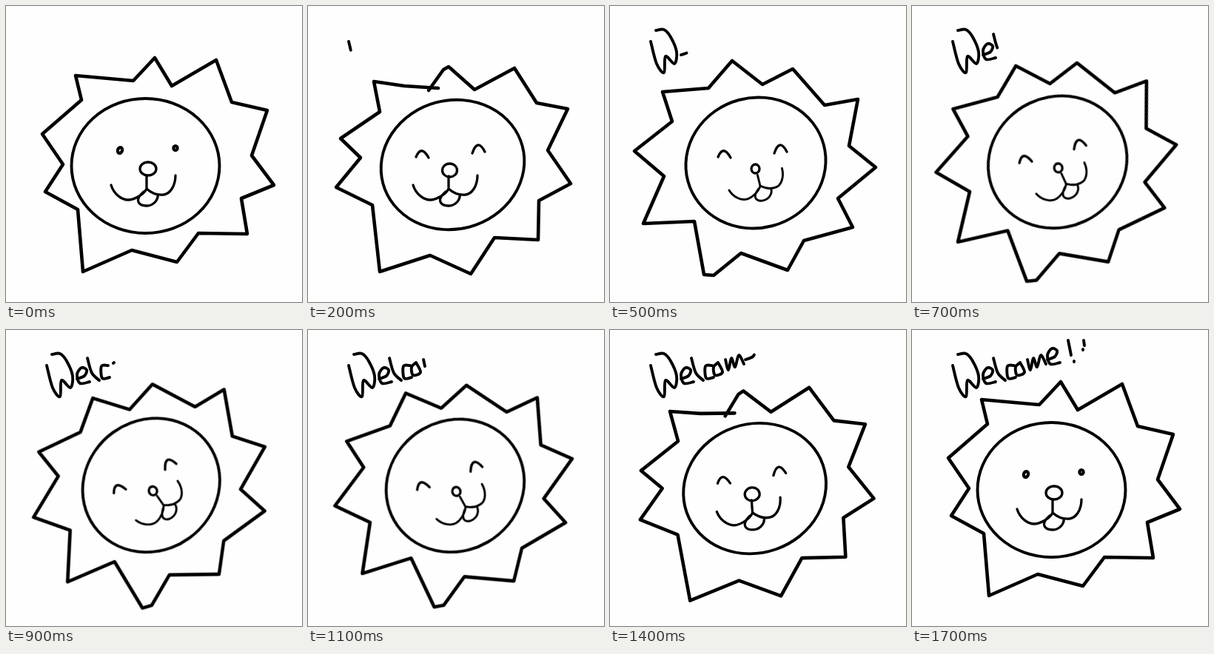
These frames come from a looping animation (400x400 px, 1800 ms). An HTML page:

```html
<!DOCTYPE html>
<html lang="en">
<head>
<meta charset="utf-8">
<title>Welcome lion</title>
<style>
  html, body { margin: 0; height: 100%; overflow: hidden; background: #fefefe; }
  svg { display: block; width: 100vw; height: 100vh; }
  path, ellipse { fill: none; stroke: #000; stroke-linecap: round; stroke-linejoin: round; }
</style>
</head>
<body>
<svg id="stage" viewBox="0 0 400 400"></svg>
<script>
const FRAME = 100, FRAMES = 18;
const stage = document.getElementById('stage');

function add(parent, tag, attrs = {}) {
  const node = document.createElementNS('http://www.w3.org/2000/svg', tag);
  for (const key in attrs) node.setAttribute(key, attrs[key]);
  return parent.appendChild(node);
}

function oval(parent, [cx, cy, rx, ry, tilt = 0], width) {
  add(parent, 'ellipse', { cx, cy, rx, ry, transform: `rotate(${tilt} ${cx} ${cy})`, 'stroke-width': width });
}

// Smooth pen line through a few points (Catmull-Rom)
function curve(text, dx = 0, dy = 0) {
  const pts = text.split(' ').map(p => p.split(',').map(Number)).map(([x, y]) => [x + dx, y + dy]);
  const at = i => pts[Math.max(0, Math.min(pts.length - 1, i))];
  let d = 'M' + pts[0];
  for (let i = 0; i < pts.length - 1; i++) {
    const [a, b, c, e] = [at(i - 1), at(i), at(i + 1), at(i + 2)];
    d += `C${b.map((v, k) => v + (c[k] - a[k]) / 6)} ${c.map((v, k) => v - (e[k] - b[k]) / 6)} ${c}`;
  }
  return d;
}

// Stem, both cheeks and tongue, around the middle of the mouth
const MUZZLE = 'M0,-17V0M-48,-5C-44,8 -33,15 -25,15S-4,8 0,0C8,7 15,9 23,8S39,-3 39,-18' +
  'M-4,4C-18,16 -10,23 0,23S16,14 15,8';

function lion({ mane, head, nose, muzzle, drawEyes }) {
  const g = add(stage, 'g');
  add(g, 'path', { d: 'M' + mane, 'stroke-width': 4.6 });
  oval(g, head, 3.9);
  oval(g, nose, 3.3);
  add(g, 'path', { d: MUZZLE, transform: muzzle, 'stroke-width': 3.3 });
  drawEyes(g);
  return g;
}

function openEyes(g) {
  oval(g, [154, 195, 3, 4, 20], 4.2);
  oval(g, [229, 192, 2.6, 3], 4.2);
}

function smilingEyes(g) {
  add(g, 'path', { d: 'M146,204Q153,187 163,205M222,199Q229,178 239,197', 'stroke-width': 3.3 });
}

const lions = {
  awake: lion({
    mane: '102,127 94,94 172,101 201,70 224,108 284,73 305,130 353,141 332,202 362,242 ' +
      '318,260 326,308 260,307 231,346 170,330 104,359 97,275 53,251 77,214 49,173z',
    head: [188.5, 216, 100, 91],
    nose: [192, 220, 11, 9],
    muzzle: 'translate(190 247)',
    drawEyes: openEyes
  }),
  happy: lion({
    mane: '163,114 183,86 190,82 225,113 279,84 309,131 351,139 324,195 355,240 312,263 311,316 ' +
      '252,313 220,362 165,337 97,359 87,269 38,245 71,205 44,179 97,143 89,102 130,108 176,111',
    head: [195.5, 214.5, 97.5, 87, -15],
    nose: [191.5, 222, 10, 9],
    muzzle: 'translate(190 247)',
    drawEyes: smilingEyes
  }),
  tilted: lion({
    mane: '84,156 71,116 133,111 165,74 206,106 247,85 290,134 335,126 323,189 359,218 308,260 ' +
      '328,299 262,317 240,357 177,334 140,364 127,363 114,291 45,294 73,230 33,196z',
    head: [197, 212, 95, 88, -15],
    nose: [196.5, 220, 5.5, 6],
    muzzle: 'translate(203 243) rotate(-14) scale(.88)',
    drawEyes: smilingEyes
  })
};

// Pen strokes of the handwritten "Welcome!!"
const LETTER_E = '96,66 106,62 109,54 102,51 96,60 100,72 113,70';
const strokes = [
  curve('55,48 63,78 73,90 75,68 87,78 90,62 82,42 73,32 62,33'),
  curve(LETTER_E),
  curve('110,38 116,58 126,68'),
  curve('138,48 129,49 130,65 140,64'),
  curve('146,44 140,50 142,61 152,57 146,44'),
  curve('156,40 160,54 164,38 169,50 174,34 181,46'),
  curve(LETTER_E, 87, -26),
  'M211,14L215,34', 'M219,42v1', 'M232,14L233,21', 'M231,26v1'
].map(d => {
  const path = add(stage, 'path', { d, 'stroke-width': 3.9 });
  return { path, length: path.getTotalLength() };
});
const inkTotal = strokes.reduce((sum, s) => sum + s.length, 0);

// The pen runs fast at first, then slows down for the second half.
function write(n) {
  let ink = Math.min(48.5 * (n - 1.75), inkTotal - 27 * (FRAMES - 1 - n));
  for (const { path, length } of strokes) {
    path.style.display = ink > 0 ? '' : 'none';
    path.setAttribute('stroke-dasharray', ink < length ? `${Math.max(0, ink)} 999` : 'none');
    ink -= length;
  }
}

// The head swings to the left and back, changing drawing on the way.
function pose(n) {
  const back = FRAMES - 1 - n, near = Math.min(n, back);
  if (near < 1) return { name: 'awake', angle: 0, shift: 0 };
  if (n < 5 || back < 4) return { name: 'happy', angle: -4.3 * (near - 2), shift: 0 };
  return {
    name: 'tilted',
    angle: -5.2 * (Math.min(n, 18.9 - n) - 5),
    shift: Math.max(0, n - 9) * 1.2
  };
}

function draw(time) {
  const n = Math.floor(time / FRAME) % FRAMES;
  const { name, angle, shift } = pose(n);
  for (const key in lions) lions[key].style.display = key === name ? '' : 'none';
  lions[name].setAttribute('transform', `translate(${shift}) rotate(${angle} 190.5 213)`);
  // Turning softens the tilted drawing
  lions.tilted.style.filter = angle ? 'blur(.7px)' : 'none';
  write(n);
}

const start = performance.now();
function tick() {
  draw(performance.now() - start);
  requestAnimationFrame(tick);
}
tick();
</script>
</body>
</html>
```
